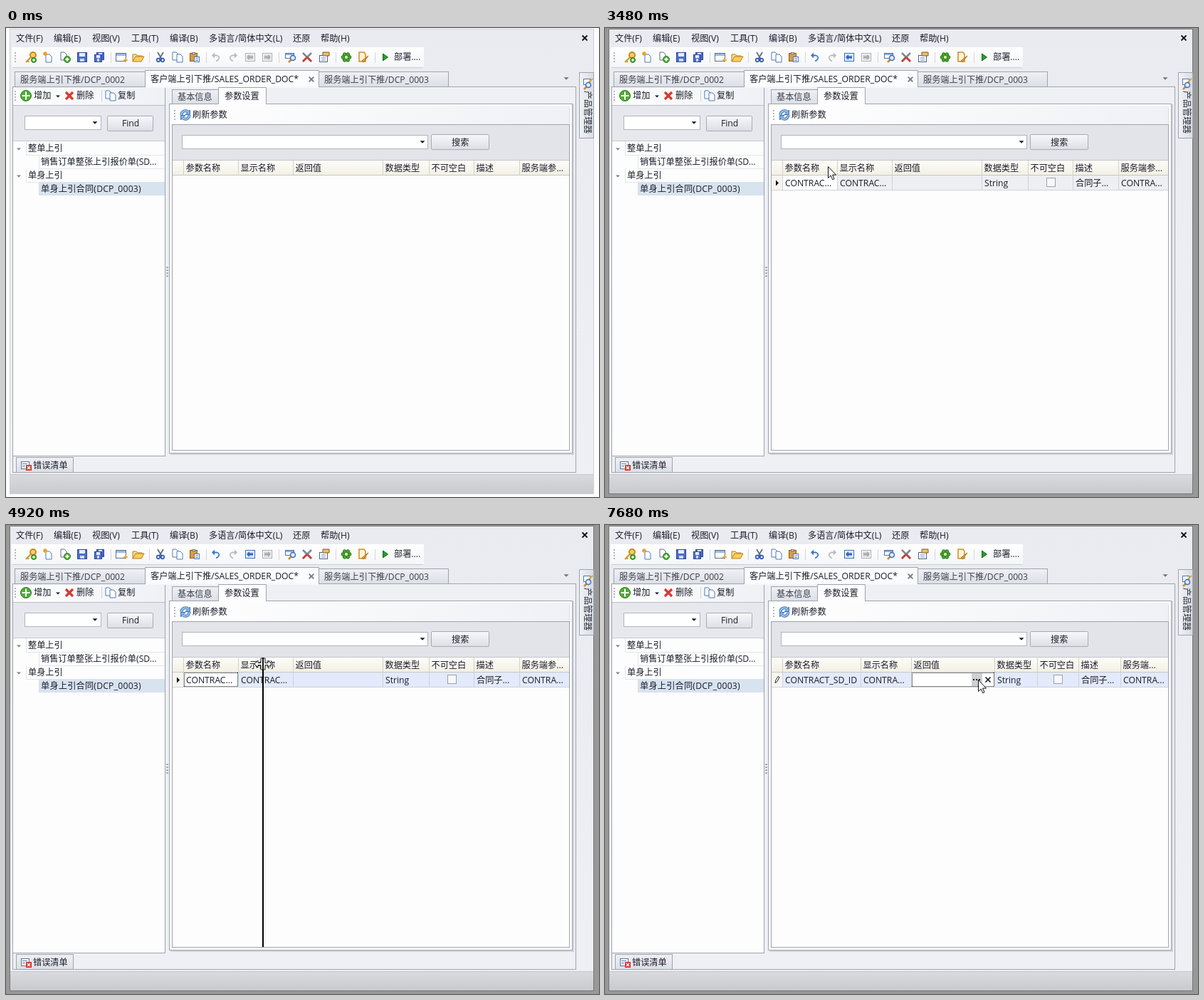
An HTML page that plays this animation: 833 px wide and 658 px high, repeating every 8 s.

```html
<!DOCTYPE html>
<html lang="zh-CN">
<head>
<meta charset="utf-8">
<title>参数设置</title>
<style>
html, body { margin: 0; width: 100%; height: 100%; overflow: hidden; background: #fdfdfd; }
svg { display: block; width: 833px; height: 658px; }
text { font: 12.2px "Open Sans", "Noto Sans CJK SC", "Noto Sans CJK", sans-serif; white-space: pre; }
rect { shape-rendering: crispEdges; }
</style>
</head>
<body>
<svg id="stage" viewBox="0 0 833 658" xmlns="http://www.w3.org/2000/svg"></svg>
<script>
const LOOP = 8000, STEP = 60;
const INK = '#1b1b2a', LINE = '#9ea3ae';

const box = (x, y, w, h, fill, stroke, extra = '') => stroke
  ? `<rect x="${x + .5}" y="${y + .5}" width="${w - 1}" height="${h - 1}" fill="${fill}" stroke="${stroke}" ${extra}/>`
  : `<rect x="${x}" y="${y}" width="${w}" height="${h}" fill="${fill}" ${extra}/>`;
const text = (x, mid, s, fill = INK, extra = '') => `<text x="${x}" y="${mid + 4.3}" fill="${fill}" ${extra}>${s}</text>`;
const path = (d, fill = 'none', stroke = 'none', w = 1, extra = '') => `<path d="${d}" fill="${fill}" stroke="${stroke}" stroke-width="${w}" ${extra}/>`;
const dot = (x, y, r, fill, stroke = 'none', w = 1) => `<circle cx="${x}" cy="${y}" r="${r}" fill="${fill}" stroke="${stroke}" stroke-width="${w}"/>`;
const at = (x, y, s) => `<g transform="translate(${x} ${y})">${s}</g>`;
const hline = (x, y, w, c = LINE) => box(x, y, w, 1, c);
const vline = (x, y, h, c = LINE) => box(x, y, 1, h, c);
const dotted = (x, y, w, h) => {
  const r = x + w, b = y + h;
  return path(`M${x} ${y + .5}H${r}M${x} ${b - .5}H${r}M${x + .5} ${y}V${b}M${r - .5} ${y}V${b}`, 'none', '#111', 1, 'stroke-dasharray="1 1"');
};
const down = (x, y, c = INK, r = 3.5) => path(`M${x - r} ${y - r / 2}h${2 * r}l${-r} ${r}z`, c);
const grip = (x, y, n) => Array.from({ length: n }, (_, i) => box(x, y + i * 4, 2, 2, '#b4b6be')).join('');
const gradient = (id, a, b, across = false) =>
  `<linearGradient id="${id}" x2="${across ? 1 : 0}" y2="${across ? 0 : 1}"><stop stop-color="${a}"/><stop offset="1" stop-color="${b}"/></linearGradient>`;

// Icons are drawn around their centre
const page = (x, y, c = '#4f78b8') => path(`M${x} ${y}h5l3 3v8h-8z`, '#fff', c);
const plus = (x, y, r) => dot(x, y, r, '#4fae35', '#2c7a1c') + path(`M${x - r + 2} ${y}h${2 * r - 4}M${x} ${y - r + 2}v${2 * r - 4}`, 'none', '#fff', 2);
const disk = (x, y, s) => box(x, y, s, s, '#4b6fc9', '#2d4595') + box(x + 3, y + 1, s - 6, s / 2 - 2, '#e8eefb') + box(x + 4, y + s - 5, s - 8, 4, '#cfd9f0');
const lens = (x, y) => path(`M${x - 2} ${y + 2}l-4 4`, 'none', '#d08a2c', 2.5) + dot(x, y, 3.5, '#dcecff', '#3f6eb5', 1.5);
const cross = (r, c, w) => path(`M${-r} ${-r}L${r} ${r}M${r} ${-r}L${-r} ${r}`, 'none', c, w);
const mirror = s => `<g transform="scale(-1 1)">${s}</g>`;
const curl = c => path('M-3 -2.500h4q4 1 3 4.500q-1 2.500-4 3.500', 'none', c, 1.8) + path('M-6 -2.500l4-4v8z', c);
const jump = (c, fill) => box(-7, -6, 14, 12, fill, c) + box(-6, -5, 12, 10, 'none', '#fff') + path('M-5 0l4-4v2.500h5v3h-5v2.500z', c);
const halves = 'M-5.500 0A5.500 5.500 0 0 1 4 -4M5.500 0A5.500 5.500 0 0 1 -4 4';
const refresh = path(halves, 'none', '#3f74b5', 4) + path('M6.500 -7v6.500h-6.500zM-6.500 7v-6.500h6.500z', '#7fb0e6', '#3f74b5') + path(halves, 'none', '#9cc6f2', 2);

const icons = [
  [35, dot(3, -3, 4, '#f6cf63', '#c98a1a', 2) + path('M0 0l-7 7M-5 4l2 3', 'none', '#d09321', 2) + plus(4, 4, 3.5)],
  [59, page(-3, -4) + path('M-7 -5h6M-4 -8v6M-6 -7l4 4M-2 -7l-4 4', 'none', '#eca21d', 1.5)],
  [83, page(-6, -7, '#5f6f86') + plus(3, 3, 4.5)],
  [107, disk(-7, -7, 14)],
  [131, disk(-4, -7, 11) + disk(-7, -4, 11)],
  [162, box(-8, -6, 15, 12, '#fff', '#5d7190') + box(-7, -5, 13, 3, '#9eb9df') + path('M3 4h6M6 1v6', 'none', '#eca21d', 1.5)],
  [186, path('M-8 6v-10h5l2 2h6v3', '#f9df92', '#b27d20') + path('M-8 6l4-7h12l-4 7z', '#ffce59', '#b27d20')],
  [217, path('M-4 -7l6 10M4 -7l-6 10', 'none', '#5a6a85', 1.7) + dot(-3, 4, 2.3, 'none', '#2e57ad', 1.7) + dot(3, 4, 2.3, 'none', '#2e57ad', 1.7)],
  [241, page(-7, -7) + page(-1, -4)],
  [265, box(-7, -6, 11, 12, '#d99b41', '#8c5a1d') + box(-4, -7, 5, 3, '#e8e8ee', '#777') + box(-1, -1, 8, 8, '#fff', '#4f78b8') + path('M1 2h4M1 4.500h4', 'none', '#4f78b8')],
  [319, mirror(curl('#b8bac0'))],
  [367, mirror(jump('#a9abb2', '#dcdde1'))],
  [399, box(-7, -6, 13, 8, '#f8fbff', '#55719e') + box(-6, -5, 11, 2, '#8aace0') + lens(4, 1)],
  [423, cross(6, '#7d8795', 2.5) + path('M-6 6L0 0M0 0l6 6', 'none', '#c94035', 2.5)],
  [447, box(-7, -3, 12, 10, '#fff', '#4f6585') + path('M-4 1h6M-4 4h6', 'none', '#5b81bb') + path('M-2 -7h9v5h-9z', '#efbf66', '#7a5a24')],
  [478, [0, 1, 2, 3, 4, 5].map(i => dot(4.5 * Math.cos(i * Math.PI / 3), 4.5 * Math.sin(i * Math.PI / 3), 2.4, '#4da52f', '#2c7b1d')).join('') + dot(0, 0, 2, '#d9f0b8')],
  [502, path('M-6 -7h7l2 3v10h-9z', '#fff3dc', '#d58a24', 1.5) + path('M7 -2L0 7l-2-2z', '#f0a33a', '#a86a14')],
  [533, path('M-3.500 -5L3.500 0L-3.500 5z', '#2a9a31', '#13701b')]
];

function statics() {
  const menus = [[14, '文件(F)'], [67, '编辑(E)'], [121, '视图(V)'], [176, '工具(T)'], [230, '编译(B)'], [285, '多语言/简体中文(L)'], [403, '还原'], [442, '帮助(H)']];
  let s = box(6, 2, 819, 651, 'url(#win)');
  s += menus.map(([x, m]) => text(x, 14.5, m)).join('');
  s += at(813, 14, cross(3.5, '#111', 1.8));

  // main toolbar
  s += box(8, 27, 579, 28, 'url(#bar)') + hline(9, 55, 577, '#c9ccd4') + grip(12, 34, 4);
  s += [147, 201, 281, 383, 463, 518].map(x => vline(x, 34, 15, '#d4d6dc')).join('');
  s += icons.map(([x, i]) => at(x, 41, i)).join('');
  s += text(545, 41, '部署....');

  // document tabs
  s += box(9, 82, 792, 542, '#eef0f4', LINE);
  s += box(12, 61, 184, 22, 'url(#tab)', LINE) + text(20, 72.5, '服务端上引下推/DCP_0002', '#3c3f49');
  s += box(439, 61, 183, 22, 'url(#tab)', LINE) + text(447, 72.5, '服务端上引下推/DCP_0003', '#3c3f49');
  s += path('M195.500 83V59.500H439.500V83', '#fbfcfd', LINE) + box(196, 82, 243, 2, '#f6f7f9');
  s += text(203, 71.5, '客户端上引下推/SALES_ORDER_DOC*') + at(429, 72, cross(3.3, '#747884', 1.8)) + down(787, 71, '#6c717c');

  // left panel
  s += box(9, 84, 215, 517, '#fdfdfd', LINE) + box(10, 84, 213, 24, 'url(#fade)') + grip(12, 88, 4);
  s += at(28, 95, plus(0, 0, 7.5)) + text(39, 95, '增加') + down(73, 96, INK, 3);
  s += at(89, 95, cross(5, '#d8382e', 3.2)) + text(99, 95, '删除') + vline(134, 87, 16, '#cdd0d8');
  s += at(147, 95, page(-7, -7) + page(-1, -4)) + text(157, 95, '复制');
  s += box(10, 108, 213, 51, '#e7e8ed') + hline(10, 108, 213, '#b9bdc7') + hline(10, 158, 213, '#c6c9d1');
  s += box(26, 123, 108, 20, '#fff', '#b0b4be') + down(125, 133);
  s += box(142, 123, 65, 22, 'url(#btn)', '#a7abb5', 'rx="2"') + text(163, 134, 'Find');
  s += [178, 197, 216].map((y, i) => hline(i === 1 ? 46 : 28, y, i === 1 ? 177 : 195, '#e3e5ea')).join('');
  s += vline(28, 159, 19, '#e3e5ea') + vline(28, 197, 19, '#e3e5ea') + vline(46, 178, 19, '#e3e5ea');
  s += box(46, 216, 177, 19, '#d7e3ee');
  s += down(18, 170, '#7b8089', 3) + text(31, 169, '整单上引') + text(49, 188, '销售订单整张上引报价单(SD...');
  s += down(18, 208, '#7b8089', 3) + text(31, 207, '单身上引') + text(49, 225.5, '单身上引合同(DCP_0003)', INK, 'letter-spacing=".2"');
  s += box(14, 602, 81, 22, 'url(#tab)', LINE) + box(21, 608, 12, 11, '#fff', '#5a7198') + path('M23 611.500h7M23 614.500h4', 'none', '#5a7198');
  s += at(32, 617, box(-4, -4, 8, 8, '#d2352c') + cross(2, '#fff', 1.5)) + text(38, 614, '错误清单');
  s += Array.from({ length: 4 }, (_, i) => box(225, 335 + i * 4, 3, 2, '#a9acb5')).join('');

  // right panel
  s += box(231, 107, 567, 492, '#d3d5db') + box(229, 106, 567, 491, '#fdfdfd', LINE);
  s += box(233, 86, 66, 21, 'url(#tab)', LINE) + text(241, 97, '基本信息', '#3c3f49');
  s += path('M298.500 107V83.500H365.500V107', '#fdfdfd', LINE) + box(299, 106, 66, 2, '#fdfdfd') + text(307, 96, '参数设置');
  s += box(233, 109, 559, 26, 'url(#fade)') + vline(791, 112, 22, '#d8dae0') + grip(236, 115, 4);
  s += box(233, 135, 559, 458, '#fdfdfd', LINE) + box(234, 136, 557, 50, '#e3e4e9');
  s += box(247, 150, 346, 20, '#fff', '#b0b4be') + down(585, 160);
  s += box(597, 149, 82, 22, 'url(#btn)', '#a7abb5', 'rx="2"') + text(626, 160.5, '搜索');

  // side tab and status bar
  s += box(805, 62, 21, 93, 'url(#side)', LINE) + at(817, 78, box(-6, -7, 10, 9, '#fff', '#4b74b4') + path('M0 0l7-7', 'none', '#e1a22f', 2) + lens(1, 2));
  s += '<text transform="translate(812.7 88) rotate(90)" fill="#2b2e38" style="font-size:12px">产品管理器</text>';
  s += box(6, 627, 819, 26, 'url(#status)') + hline(6, 626, 819, '#c3c5cb');
  return s;
}

const defs = '<defs>' + gradient('win', '#e9ebf0', '#eef0f4') + gradient('bar', '#ffffff', '#f5f6f8') + gradient('tab', '#eff0f4', '#dcdfe6') +
  gradient('btn', '#f7f8fa', '#dcdee4') + gradient('fade', '#ffffff', '#f0f1f5', true) + gradient('side', '#f2f3f6', '#d9dce3', true) +
  gradient('status', '#d9dade', '#c9cace') + gradient('head', '#fdfcf8', '#f2f0e4') + gradient('tip', '#ffffff', '#e4e9f3') + '</defs>';

document.getElementById('stage').innerHTML = `${defs}<g id="edge"></g>${statics()}<g id="live"></g>`;
const edge = document.getElementById('edge'), live = document.getElementById('live');

const wide = [234, 250, 360, 431, 548, 608, 666, 725, 791];
const narrow = [234, 250, 327, 404, 530, 595, 658, 722, 791];
const heads = ['', '参数名称', '显示名称', '返回值', '数据类型', '不可空白', '描述', '服务端参...'];
const cells = ['', 'CONTRAC...', 'CONTRAC...', '', 'String', '', '合同子...', 'CONTRA...'];

function grid(t) {
  const resized = t >= 5100, picked = t >= 4560, editing = t >= 6060;
  const cols = resized ? wide : narrow;
  let s = box(234, 186, 557, 21, 'url(#head)') + hline(234, 185, 557, '#c4c6cc') + hline(234, 206, 557, '#c8c8c2');
  heads.forEach((h, i) => {
    if (i) s += vline(cols[i] - 1, 186, 21, '#d3d2c8');
    s += text(cols[i] + 2.5, 196.5, resized && i === 7 ? '服务端...' : h);
  });
  if (t < 2760) return s;
  s += box(234, 207, 557, 20, picked ? '#e2eafb' : '#eeeff2') + hline(234, 227, 557, '#d0d3da');
  s += box(234, 207, 15, 20, '#f6f5ee');
  const focus = editing ? 3 : 1, left = cols[focus], span = cols[focus + 1] - left - 1;
  s += box(left, 207, span, 20, '#fff');
  cells.forEach((c, i) => {
    if (i) s += vline(cols[i] - 1, 207, 21, '#cfd2da');
    if (resized && i === 1) c = 'CONTRACT_SD_ID';
    if (resized && i === 2) c = 'CONTRA...';
    s += text(cols[i] + 3, 217.5, c);
  });
  if (picked) s += dotted(left, 207, span, 20);
  s += box(Math.round((cols[5] + cols[6]) / 2) - 7, 210, 13, 13, '#f7f8fa', '#9da1aa');
  if (!editing) return s + path('M240 213.500l4 4l-4 4z', '#111');
  s += path('M239 221.500l1-4l3-5l2 1l-3 6z', '#fff', '#222');
  if (t >= 6900) s += box(515, 208, 15, 18, t >= 7680 ? '#cfd1d5' : '#e6e7ea');
  return s + [517, 521, 525].map(x => box(x, 216, 2, 2, '#111')).join('') + at(538, 217, cross(3.5, '#111', 1.6));
}

// start, end, x, y, width, height, words
const tipText = '此显示名称应用到全单上引窗口中输入栏位的标签';
const tips = [
  [3600, 3840, 318, 230, 86, 48, '不可空白'],
  [4320, 4500, 340, 230, 315, 45, tipText],
  [5580, 5820, 370, 230, 315, 37, tipText]
];
const tip = ([, , x, y, w, h, s]) => box(x + 2, y + 2, w, h, '#d5d7dd') + box(x, y, w, h, 'url(#tip)', '#9aa2b2') +
  dot(x + 13, y + 13, 7, '#5d94d6', '#3567a8') + box(x + 12, y + 12, 2, 5, '#fff') + box(x + 12, y + 9, 2, 2, '#fff') +
  text(x + 25, y + (w < 100 ? 20 : 13), s, '#4c4c54');

// time, x, y of the pointer tip
const route = [
  [300, 808, 64], [480, 690, 128], [660, 475, 147], [780, 395, 147], [960, 302, 122], [1080, 292, 118],
  [3180, 292, 118], [3540, 317, 209], [3780, 322, 212], [4080, 421, 219], [4140, 421, 219],
  [4380, 342, 212], [4560, 303, 216], [4680, 326, 195], [4740, 326, 195], [4860, 360, 195], [4920, 361, 195],
  [5340, 361, 195], [5580, 378, 209], [5820, 395, 210], [6180, 463, 213],
  [6240, 463, 213], [6300, 459, 215], [6600, 498, 220], [6900, 524, 217], [LOOP, 524, 217]
];
function pointer(t) {
  const i = route.findIndex(k => k[0] > t), a = route[i - 1], b = route[i];
  const u = (t - a[0]) / (b[0] - a[0]);
  return [1, 2].map(j => Math.round(a[j] + (b[j] - a[j]) * u));
}
const arrow = path('M.5 .5v16l3.700-3.500l2.500 5.700l2.300-1l-2.500-5.600h5z', '#fff', '#111');
const splitter = path('M-12 0l5-5v3.500h4v-6.500h6v6.500h4v-3.500l5 5l-5 5v-3.500h-4v6.500h-6v-6.500h-4v3.500z', '#fff', '#111') + box(-1, -8, 2, 16, '#111');

function draw(t) {
  const dim = t >= 1680, loaded = t >= 3240;
  edge.innerHTML = box(0, 0, 833, 658, dim ? '#989898' : '#fdfdfd') + box(5, 1, 821, 653, '#eceef2', dim ? '#777' : '#d0d2d8');

  let s = '';
  if (t >= 960 && t < 3300) s += box(241, 111, 77, 22, t >= 2640 && t < 2760 ? '#91c4f8' : '#b5dafc', '#4d94dc');
  s += at(252, 122, refresh) + text(262, 122, '刷新参数');
  s += at(295, 41, curl(loaded ? '#3f74c9' : '#b8bac0'));
  s += at(343, 41, loaded ? jump('#2f66bd', '#cfe0f7') : jump('#a9abb2', '#dcdde1'));
  s += grid(t);
  s += tips.filter(k => t >= k[0] && t < k[1]).map(tip).join('');
  if (t >= 300) {
    const [x, y] = pointer(t), sizing = t >= 4680 && t < 5400;
    if (t >= 4740 && t < 5100) s += box(x - 1, 186, 2, 406, '#000');
    s += at(x, y, sizing ? splitter : arrow);
  }
  live.innerHTML = s;
}

let last = -1;
function tick(now) {
  const t = Math.floor(now % LOOP / STEP) * STEP;
  if (t !== last) draw(last = t);
  requestAnimationFrame(tick);
}
draw(0);
requestAnimationFrame(tick);
</script>
</body>
</html>
```
